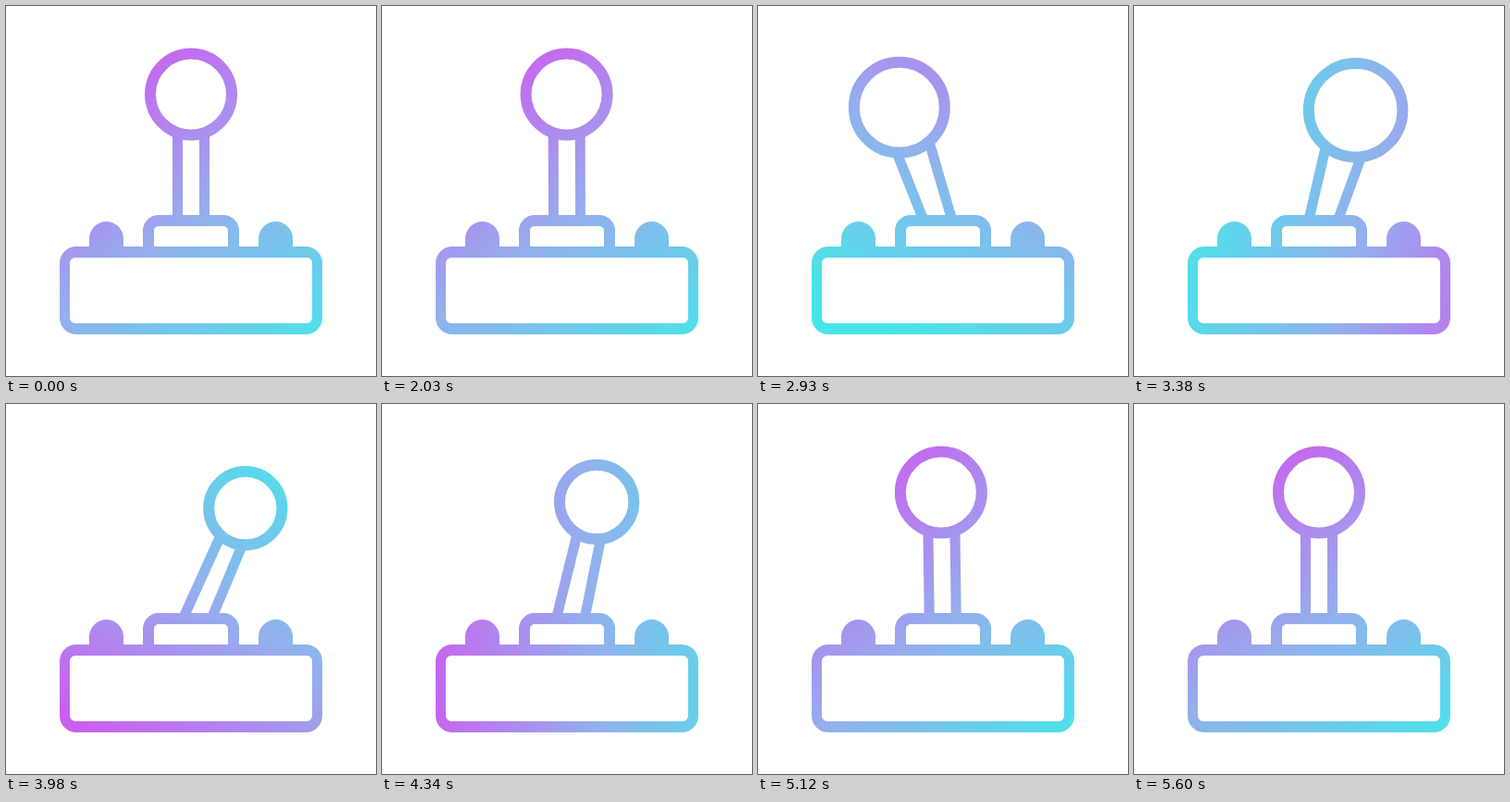
Animation, 400 px wide and 400 px high, one loop 5630 ms. Source, as an HTML page with a canvas:

```html
<!DOCTYPE html>
<html lang="en">
<head>
<meta charset="utf-8">
<title>Joystick</title>
<style>
  html, body { margin: 0; width: 100%; height: 100%; overflow: hidden; background: #fff; }
  canvas { display: block; width: 400px; height: 400px; }
</style>
</head>
<body>
<canvas id="stage" width="400" height="400"></canvas>
<script>
const ctx = document.getElementById('stage').getContext('2d');
const LOOP = 5630, HOLD = 2000, STEP = 30, STEPS = 120;

// Turning points of the ball: rest, left, right, then a small wobble back to rest
const REST = { at: 0, x: 200, y: 95.5 };
const TURNS = [
  REST,
  { at: 21, x: 138, y: 109.5 },
  { at: 58.5, x: 265, y: 113 },
  { ...REST, at: 101, x: 190 },
  { ...REST, at: 108, x: 210 },
  { ...REST, at: 118 },
  { ...REST, at: STEPS }
];

const mix = (a, b, t) => a + (b - a) * t;
const smooth = t => t * t * (3 - 2 * t);
const steep = t => t * t / (t * t + (1 - t) * (1 - t));

function ballAt(n) {
  const next = Math.max(1, TURNS.findIndex(turn => n <= turn.at));
  const from = TURNS[next - 1], to = TURNS[next];
  const u = (n - from.at) / (to.at - from.at);
  const isFront = next === 2, isBack = next === 3;
  const e = isFront ? steep(u) : smooth(u);

  // The ball grows while it passes the front and shrinks behind
  let r = 50;
  if (isFront) r += 9 * Math.sin(Math.PI * u) ** 2;
  if (isBack) r -= 4.5 * Math.sin(Math.PI * Math.sqrt(u));
  return { x: mix(from.x, to.x, e), y: mix(from.y, to.y, smooth(e)), r };
}

// One full turn of the gradient, with its middle drifting along
function makePaint(n) {
  const turn = steep((n / STEPS) ** .85);
  const angle = (55 + 360 * turn) * Math.PI / 180;
  const mid = .42 + .18 * Math.sin(Math.PI * turn) + .08 * Math.sin(2 * Math.PI * turn);
  const dx = Math.cos(angle) * 385, dy = Math.sin(angle) * 385;
  const x = 200 - dx * mid, y = 200 - dy * mid;
  const paint = ctx.createLinearGradient(x, y, x + dx, y + dy);
  paint.addColorStop(0, '#cb5fef');
  paint.addColorStop(.5, '#93b0ed');
  paint.addColorStop(1, '#47e5e9');
  return paint;
}

function stroke(width, trace) {
  ctx.lineWidth = width;
  ctx.beginPath();
  trace();
  ctx.stroke();
}

function drawStick(n) {
  const { x, y, r } = ballAt(n);
  const baseX = mix(200, x, .13), baseY = 230;
  const dist = Math.hypot(baseX - x, baseY - y);
  const ux = (baseX - x) / dist, uy = (baseY - y) / dist;
  const ring = r - 6, grow = r - 50;
  const topHalf = 14.5 + grow * (grow > 0 ? .8 : .4);
  const baseHalf = 14.5 + Math.abs(grow) * .2;
  const reach = Math.sqrt(ring * ring - topHalf * topHalf);

  stroke(12, () => ctx.arc(x, y, ring, 0, 7));
  for (const side of [-1, 1]) {
    stroke(11, () => {
      ctx.moveTo(x + ux * reach + side * uy * topHalf, y + uy * reach - side * ux * topHalf);
      ctx.lineTo(baseX + side * baseHalf, baseY);
    });
  }
}

function drawBase() {
  stroke(12, () => {
    ctx.moveTo(154, 264);
    ctx.arcTo(154, 232, 170, 232, 11);
    ctx.arcTo(246, 232, 246, 250, 11);
    ctx.lineTo(246, 264);
  });
  ctx.beginPath();
  ctx.roundRect(58, 260, 284, 95, 18);
  ctx.roundRect(69, 272, 262, 71, 6);
  ctx.fill('evenodd');
  for (const x of [108.5, 291.5]) {
    ctx.beginPath();
    ctx.arc(x, 251.5, 18.5, Math.PI, 0);
    ctx.lineTo(x + 18.5, 264);
    ctx.lineTo(x - 18.5, 264);
    ctx.fill();
  }
}

function draw() {
  const time = performance.now() % LOOP;
  const n = Math.max(0, Math.floor((time - HOLD) / STEP));
  ctx.fillStyle = '#fff';
  ctx.fillRect(0, 0, 400, 400);
  ctx.fillStyle = ctx.strokeStyle = makePaint(n);
  drawStick(n);
  drawBase();
  requestAnimationFrame(draw);
}
draw();
</script>
</body>
</html>
```
